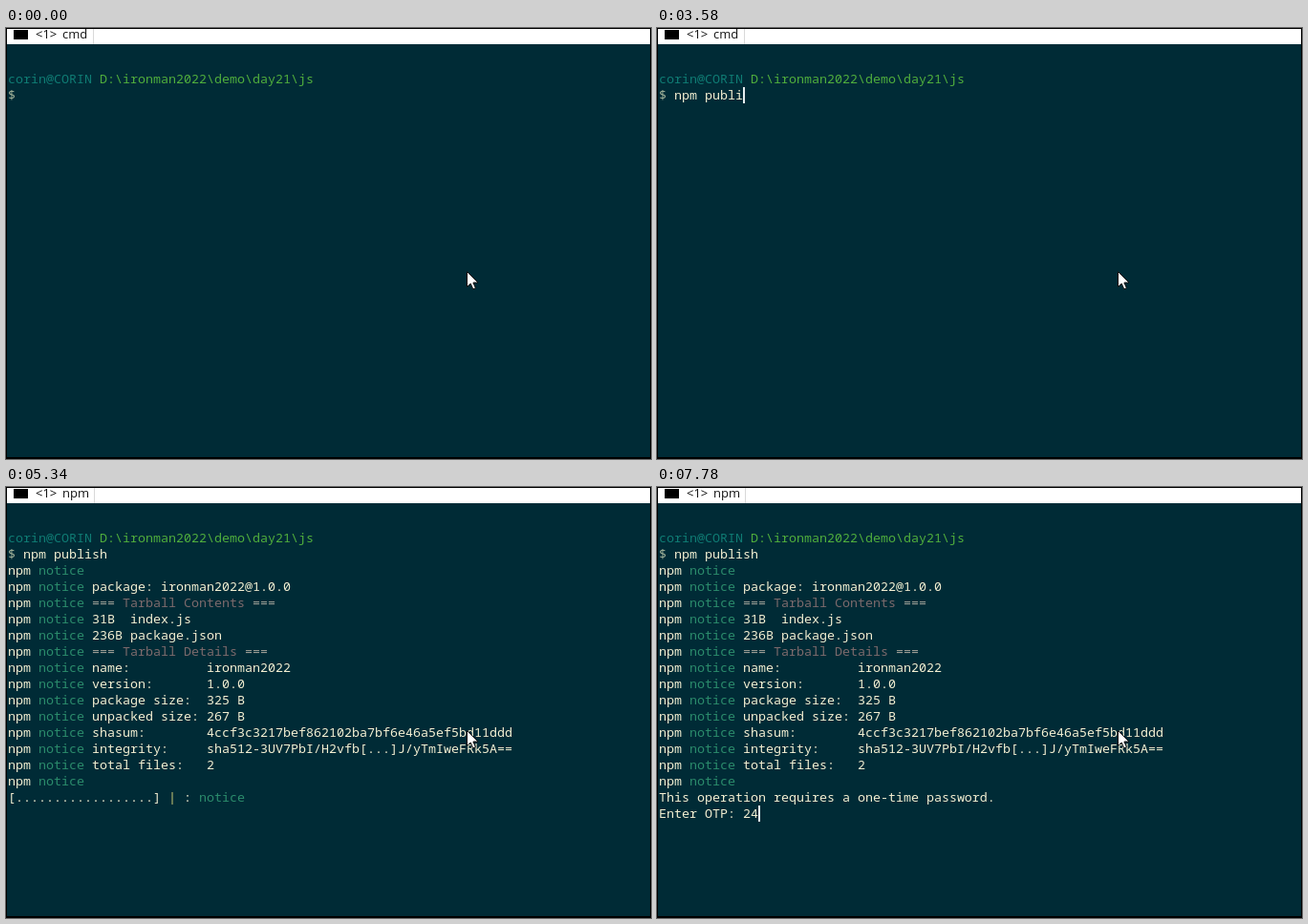
Write an HTML page that moves like this. It is 675 px wide and 452 px high and loops after 8 s.

```html
<!DOCTYPE html>
<html lang="en">
<head>
<meta charset="utf-8">
<title>Terminal</title>
<style>
  html, body { margin: 0; width: 100%; height: 100%; overflow: hidden; background: #000; }
  svg { display: block; width: 675px; height: 452px; }
  text { white-space: pre; font: 13.333px "Noto Sans Mono", "DejaVu Sans Mono", monospace; fill: #f3efd2; }
  .tab { font: 13px "Open Sans", "Noto Sans", sans-serif; fill: #111; word-spacing: -1px; }
  .user { fill: #0f7c74; }
  .path { fill: #4fae3d; }
  .dollar { fill: #a5b59c; }
  .notice { fill: #2b8c6c; }
  .rule { fill: #a5a49a; }
  .head { fill: #7c6a6c; }
  .spin { fill: #cfcb78; }
</style>
</head>
<body>
<svg viewBox="0 0 675 452">
  <rect width="675" height="452" fill="#000"/>
  <rect x="1" y="17" width="673" height="433" fill="#002b36"/>
  <rect x="1" y="1" width="673" height="16" fill="#fff"/>
  <rect x="8" y="2" width="15" height="10" fill="#000"/>
  <text class="tab" x="31" y="11">&lt;1&gt;</text>
  <text class="tab" x="59" y="11" id="title"></text>
  <rect id="edge" y="1" width="1" height="16" fill="#d9d9d9"/>
  <g id="prompt"></g>
  <g id="output"></g>
  <g id="progress"></g>
  <g id="question"></g>
  <rect id="caret" width="2" height="17" fill="#e6eef0"/>
  <path d="M482.5 255.5V271.5L486.2 268L488.8 273.8L491.4 272.7L488.9 267H494Z"
        fill="#fff" stroke="#111" stroke-width="1"/>
</svg>
<script>
const LOOP = 8000, CELL = 8, ROW = 17;
const ENTER = 4280, RUNNING = 4350, OUTPUT = 5340, ASK = 5690;
const COMMAND = "npm publish", CODE = "24";
const commandKeys = [210, 1190, 1610, 1820, 2100, 2600, 3020, 3230, 3580, 3650, 3930];
const codeKeys = [6730, 7780];
const caretOff = [[0, 210], [770, 1190], [4840, ASK], [6250, 6530], [7290, 7780]];

const el = id => document.getElementById(id);
const colX = col => 2 + col * CELL;
const rowY = row => 45 + row * ROW;

function put(group, row, col, text, cls = "") {
  const node = document.createElementNS("http://www.w3.org/2000/svg", "text");
  node.setAttribute("class", cls);
  node.setAttribute("x", colX(col));
  node.setAttribute("y", rowY(row) + 13);
  node.textContent = text;
  el(group).append(node);
  return node;
}

put("prompt", 0, 0, "corin@CORIN", "user");
put("prompt", 0, 12, "D:\\ironman2022\\demo\\day21\\js", "path");
put("prompt", 1, 0, "$", "dollar");
const command = put("prompt", 1, 2, "");

// A string is plain, a pair is label and value, a heading starts with "#".
const lines = [
  "",
  "package: ironman2022@1.0.0",
  "#Tarball Contents",
  "31B  index.js",
  "236B package.json",
  "#Tarball Details",
  ["name:", "ironman2022"],
  ["version:", "1.0.0"],
  ["package size:", "325 B"],
  ["unpacked size:", "267 B"],
  ["shasum:", "4ccf3c3217bef862102ba7bf6e46a5ef5bd11ddd"],
  ["integrity:", "sha512-3UV7PbI/H2vfb[...]J/yTmIweFRk5A=="],
  ["total files:", "2"],
  ""
];
lines.forEach((line, i) => {
  const row = i + 2;
  put("output", row, 0, "npm");
  put("output", row, 4, "notice", "notice");
  if (Array.isArray(line)) {
    put("output", row, 11, line[0]);
    put("output", row, 26, line[1]);
  } else if (line[0] === "#") {
    const head = line.slice(1);
    put("output", row, 11, "===", "rule");
    put("output", row, 15, head, "head");
    put("output", row, 16 + head.length, "===", "rule");
  } else {
    put("output", row, 11, line);
  }
});

put("progress", 16, 0, "[" + ".".repeat(18) + "]");
put("progress", 16, 21, "|", "spin");
put("progress", 16, 23, ":");
put("progress", 16, 25, "notice", "notice");

put("question", 16, 0, "This operation requires a one-time password.");
put("question", 17, 0, "Enter OTP:");
const code = put("question", 17, 11, "");

const pressed = (keys, t) => keys.filter(k => k <= t).length;
const show = (id, on) => el(id).setAttribute("visibility", on ? "visible" : "hidden");

function draw(t) {
  const typed = pressed(commandKeys, t), digits = pressed(codeKeys, t);
  command.textContent = COMMAND.slice(0, typed);
  code.textContent = CODE.slice(0, digits);

  const [title, edge] = t < ENTER ? ["cmd", 91] : t < RUNNING ? ["cmd - npm publish", 173] : ["npm", 92];
  el("title").textContent = title;
  el("edge").setAttribute("x", edge);

  show("output", t >= OUTPUT);
  show("progress", t >= OUTPUT && t < ASK);
  show("question", t >= ASK);

  const [row, col] = t < ENTER ? [1, 2 + typed] : t < ASK ? [2, 0] : [17, 11 + digits];
  el("caret").setAttribute("x", colX(col));
  el("caret").setAttribute("y", rowY(row));
  show("caret", !caretOff.some(([from, to]) => t >= from && t < to));
}

const start = performance.now();
function tick() {
  draw((performance.now() - start) % LOOP);
  requestAnimationFrame(tick);
}
tick();
</script>
</body>
</html>
```
